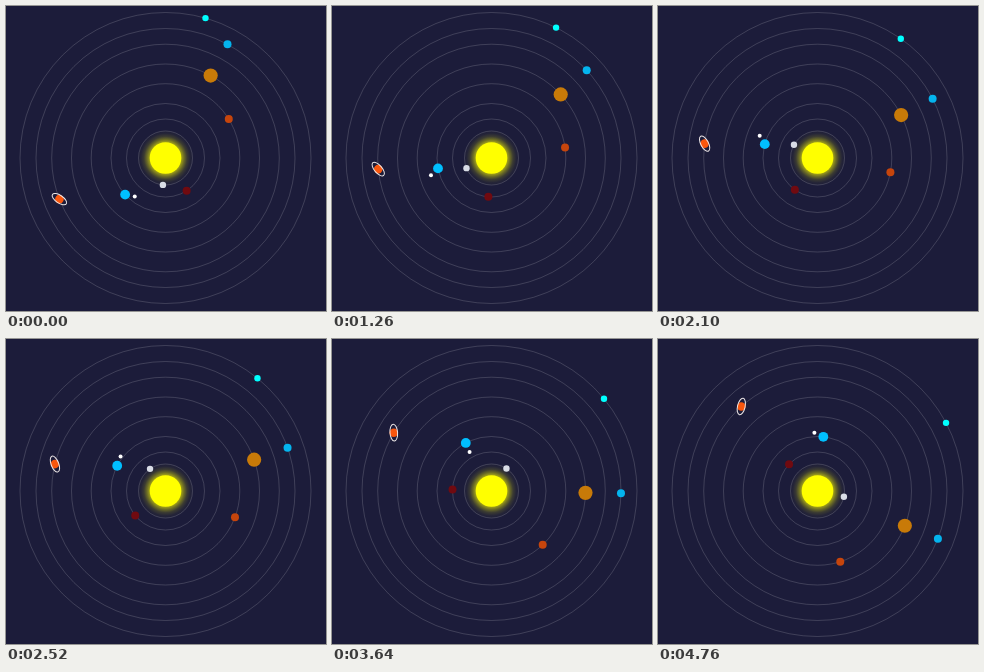
An HTML page for the animation above (4900 ms loop, 320x305 px).

```html
<!DOCTYPE html>
<html lang="en">
<head>
<meta charset="utf-8">
<title>Solar system</title>
<style>
  html, body { margin: 0; width: 100%; height: 100%; overflow: hidden; background: #1c1c3a; }
  svg { display: block; width: 320px; height: 305px; }
  .orbit { fill: none; stroke: #fff; stroke-opacity: .2; stroke-width: .8; }
  .ring { fill: none; stroke: #ece6e6; stroke-width: 1; }
</style>
</head>
<body>
<svg id="stage" viewBox="0 0 320 305">
  <defs>
    <radialGradient id="glow">
      <stop offset=".56" stop-color="#ff0" stop-opacity=".6"/>
      <stop offset=".66" stop-color="#ff0" stop-opacity=".36"/>
      <stop offset=".77" stop-color="#ff0" stop-opacity=".14"/>
      <stop offset=".88" stop-color="#ff0" stop-opacity=".04"/>
      <stop offset="1" stop-color="#ff0" stop-opacity="0"/>
    </radialGradient>
  </defs>
</svg>
<script>
const STEP = 140, STEPS = 35;
const UNIT = 14;          // steps per unit of orbital period
const LAG = 1.72, RAMP = 6; // slow start: steps lost, and over how many
const CX = 159.5, CY = 152;

// orbit radius, body radius, colour, period in units, angle at the loop start
const planets = [
  { orbit: 27,    r: 3.2, color: '#d9dde6', period: 3,  start: 95.5 },
  { orbit: 39,    r: 4,   color: '#700a10', period: 5,  start: 57.2 },
  { orbit: 54.5,  r: 4.9, color: '#00bfff', period: 6,  start: 137.8, moon: true },
  { orbit: 74.3,  r: 4,   color: '#c6450c', period: 8,  start: -31.6 },
  { orbit: 94,    r: 7.1, color: '#c87a08', period: 10, start: -61.3 },
  { orbit: 113.8, r: 4.3, color: '#f9560d', period: 12, start: 158.8, ring: true },
  { orbit: 129.5, r: 4,   color: '#04b4ee', period: 10, start: -61.4 },
  { orbit: 145.5, r: 3.2, color: '#0ff',    period: 18, start: -74.05 }
];
const moon = { orbit: 9.8, r: 2, period: 1.5, start: 11 };
const RING_TILT = -125;

const stage = document.getElementById('stage');

function add(parent, tag, attrs) {
  const el = document.createElementNS('http://www.w3.org/2000/svg', tag);
  for (const key in attrs) el.setAttribute(key, attrs[key]);
  return parent.appendChild(el);
}

function circle(parent, r, fill, x = 0, y = 0) {
  return add(parent, 'circle', { cx: x, cy: y, r, fill });
}

function angleAt(body, phase) {
  return body.start + 360 * phase / (body.period * UNIT);
}

function place(el, orbit, degrees, x = 0, y = 0) {
  const a = degrees * Math.PI / 180;
  const px = x + orbit * Math.cos(a), py = y + orbit * Math.sin(a);
  el.setAttribute('transform', `translate(${px.toFixed(3)} ${py.toFixed(3)})`);
}

for (const p of planets) {
  add(stage, 'circle', { cx: CX, cy: CY, r: p.orbit, class: 'orbit' });
}
circle(stage, 28, 'url(#glow)', CX, CY);
circle(stage, 15.8, '#ff0', CX, CY);

for (const p of planets) {
  p.el = add(stage, 'g', {});
  circle(p.el, p.r, p.color);
  if (p.moon) p.moonEl = circle(p.el, moon.r, '#fff');
  if (p.ring) p.ringEl = add(p.el, 'ellipse', { rx: 8.4, ry: 3.8, class: 'ring' });
}

function phaseAt(step) {
  const left = Math.max(0, 1 - step / RAMP);
  return step - LAG * (1 - left * left);
}

function draw(step) {
  const phase = phaseAt(step);
  for (const p of planets) {
    const angle = angleAt(p, phase);
    place(p.el, p.orbit, angle, CX, CY);
    if (p.moon) place(p.moonEl, moon.orbit, angleAt(moon, phase));
    if (p.ring) p.ringEl.setAttribute('transform', `rotate(${angle + RING_TILT})`);
  }
}

const begin = performance.now();
function tick() {
  const time = performance.now() - begin;
  draw(Math.floor(time / STEP) % STEPS);
  requestAnimationFrame(tick);
}
tick();
</script>
</body>
</html>
```
